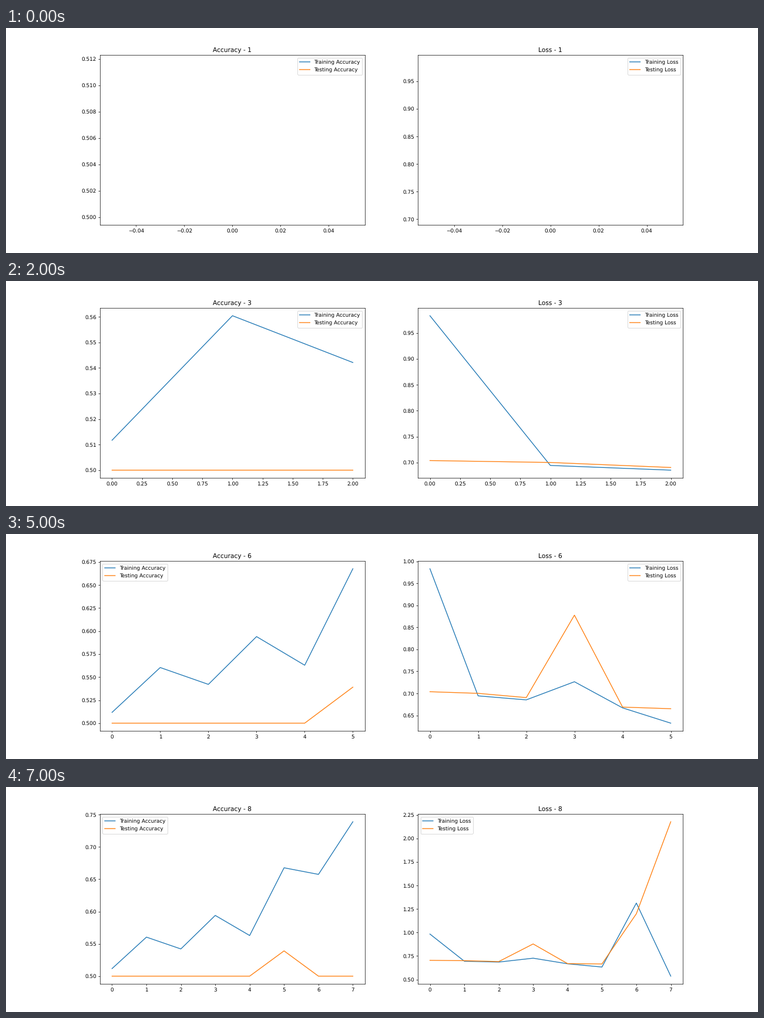
Recreate the animation shown at these times as a matplotlib script. Size 1280x384 px, loop 8 s.

```python
import matplotlib.pyplot as plt
import numpy as np
from matplotlib.animation import FuncAnimation

plt.rcParams["text.hinting"] = "none"

EPOCHS = 8
epoch = np.arange(EPOCHS)


def spike(at, height):
    """A one-epoch jump of the given height."""
    return np.where(epoch == at, height, 0.0)


def training_accuracy():
    """A rising trend, with every odd epoch swinging ever further above it."""
    trend = np.interp(epoch, [0, 2, 4, 6], [0.5117, 0.5421, 0.5629, 0.6575])
    return trend + (epoch % 2) * (0.0325 + 0.001 * epoch**2)


def testing_accuracy():
    """Chance level, but for one better epoch."""
    return 0.5 + spike(5, 0.0391)


def training_loss():
    """A steep first drop, then a slow decline with two setbacks."""
    decline = np.interp(epoch, [0, 1, 4, 5, 7], [0.9833, 0.6944, 0.6671, 0.6324, 0.5355])
    return decline + spike(3, 0.0503) + spike(6, 0.729)


def testing_loss():
    """A gentle dip with one setback, then runaway growth."""
    dip = 0.6845 + 0.0193 * np.cos(np.pi * epoch / 5)
    runaway = 0.53 * np.maximum(epoch - 5, 0) ** 1.5
    return dip + spike(3, 0.1993) + runaway


METRICS = {
    "Accuracy": {"Training": training_accuracy(), "Testing": testing_accuracy()},
    "Loss": {"Training": training_loss(), "Testing": testing_loss()},
}

fig, axes = plt.subplots(1, 2, figsize=(20, 6), dpi=64)
fig.subplots_adjust(left=0.125, right=0.9, bottom=0.125, top=0.88, wspace=0.2)


def draw_metric(ax, name, count):
    """Plot both curves of one metric over the first epochs."""
    ax.clear()
    for phase, values in METRICS[name].items():
        ax.plot(values[:count], label=f"{phase} {name}")
    ax.set_title(f"{name} - {count}")
    legend = ax.legend(loc="best")
    for line in [*ax.lines, *legend.get_lines()]:
        line.set_snap(False)


def update(i):
    for ax, name in zip(axes, METRICS):
        draw_metric(ax, name, i + 1)
    return []


anim = FuncAnimation(fig, update, frames=EPOCHS, interval=1000,
                     init_func=lambda: update(0), repeat=True, repeat_delay=0)
plt.show()
```
